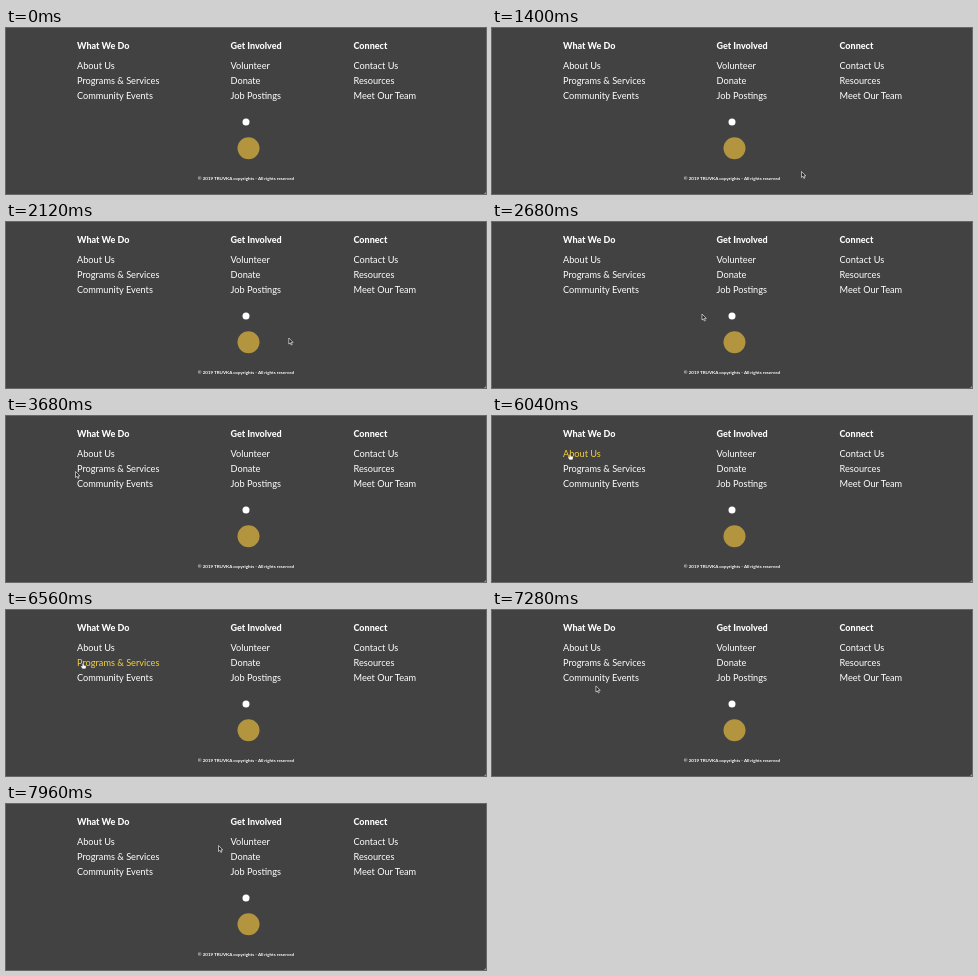
An HTML page for the animation above (8000 ms loop, 480 px wide and 166 px high).

```html
<!DOCTYPE html>
<html lang="en">
<head>
<meta charset="utf-8">
<title>Site footer</title>
<style>
  html, body { margin: 0; width: 100%; height: 100%; overflow: hidden; background: #424242; }
  svg { display: block; width: 100vw; height: 100vh; }
  text { font: 9.2px Lato, "Open Sans", sans-serif; fill: #fff; }
  .head { font-size: 9px; font-weight: 800; }
  .legal { font-size: 4.5px; font-weight: 700; text-anchor: middle; }
</style>
</head>
<body>
<svg viewBox="0 0 480 166">
  <rect width="480" height="166" fill="#424242"/>
  <path d="M480 164V166H478Z" fill="#999"/>
  <g id="menu"></g>
  <circle cx="240" cy="94" r="3.5" fill="#fff"/>
  <circle cx="242.5" cy="120.3" r="11" fill="#b3943f"/>
  <text class="legal" x="240" y="152">© 2019 TRUVKA copyrights - All rights reserved</text>
  <g id="cursor" stroke-linejoin="round">
    <path id="arrow" d="M0 0V6L1.4 4.8L2.4 7L3.4 6.5L2.4 4.4H4.3Z" fill="#222" stroke="#f2f2f2" stroke-width=".65"/>
    <path id="hand" d="M-.7 .4Q0 -.4 .7 .4V1.8L2.6 2.2Q3.3 2.5 3.1 3.5L2.5 5.3H-.5L-2.1 3Q-2 2.1 -.7 2.8Z" fill="#fff" stroke="#444" stroke-width=".25"/>
  </g>
</svg>
<script>
const LOOP = 8000, STEP = 40, YELLOW = '#f4d03a';
const $ = id => document.getElementById(id);

const columns = [
  [71, 'What We Do', 'About Us', 'Programs & Services', 'Community Events'],
  [224.5, 'Get Involved', 'Volunteer', 'Donate', 'Job Postings'],
  [347.5, 'Connect', 'Contact Us', 'Resources', 'Meet Our Team']
];

// pointer strokes: begin, end, target x, target y; it rests in between
const entry = { x: 312, y: 168 };
const strokes = [
  [1000, 1400, 309.5, 143.5], [1400, 1600, 305.5, 123.5],
  [1860, 2680, 210, 92], [2700, 2840, 185.5, 104],
  [3100, 3680, 69.5, 55.5], [3680, 4040, 76, 42],
  [4180, 4400, 46.5, 54], [4400, 4560, 57.5, 51],
  [4700, 4920, 69.5, 42], [4920, 5320, 78, 38.5],
  [6020, 6540, 77, 53.5],
  [6820, 7640, 122.5, 91.5], [7640, 7960, 212.5, 41.5]
];

function addText(x, y, label, cls) {
  const el = document.createElementNS('http://www.w3.org/2000/svg', 'text');
  el.setAttribute('x', x);
  el.setAttribute('y', y);
  if (cls) el.setAttribute('class', cls);
  el.textContent = label;
  return $('menu').appendChild(el);
}

const links = [];
for (const [x, head, ...items] of columns) {
  addText(x, 21, head, 'head');
  items.forEach((label, i) => {
    const y = 40.6 + 15 * i;
    const el = addText(x, y, label);
    links.push({ el, x, y, right: x + el.getComputedTextLength() });
  });
}

const smooth = u => u * u * (3 - 2 * u);

function pointer(t) {
  let { x, y } = entry;
  for (const [begin, end, toX, toY] of strokes) {
    if (t <= begin) break;
    const k = smooth(Math.min(1, (t - begin) / (end - begin)));
    x += (toX - x) * k;
    y += (toY - y) * k;
  }
  return { x, y };
}

function draw(t) {
  const { x, y } = pointer(t);
  let over = false;
  for (const link of links) {
    const hit = x > link.x && x < link.right && y > link.y - 8 && y < link.y + .5;
    link.el.style.fill = hit ? YELLOW : '#fff';
    over = over || hit;
  }
  $('cursor').setAttribute('transform', `translate(${x} ${y})`);
  $('arrow').style.display = over ? 'none' : '';
  $('hand').style.display = over ? '' : 'none';
}

const start = performance.now();
function tick() {
  const t = (performance.now() - start) % LOOP;
  draw(Math.floor(t / STEP) * STEP);
  requestAnimationFrame(tick);
}
tick();
</script>
</body>
</html>
```
